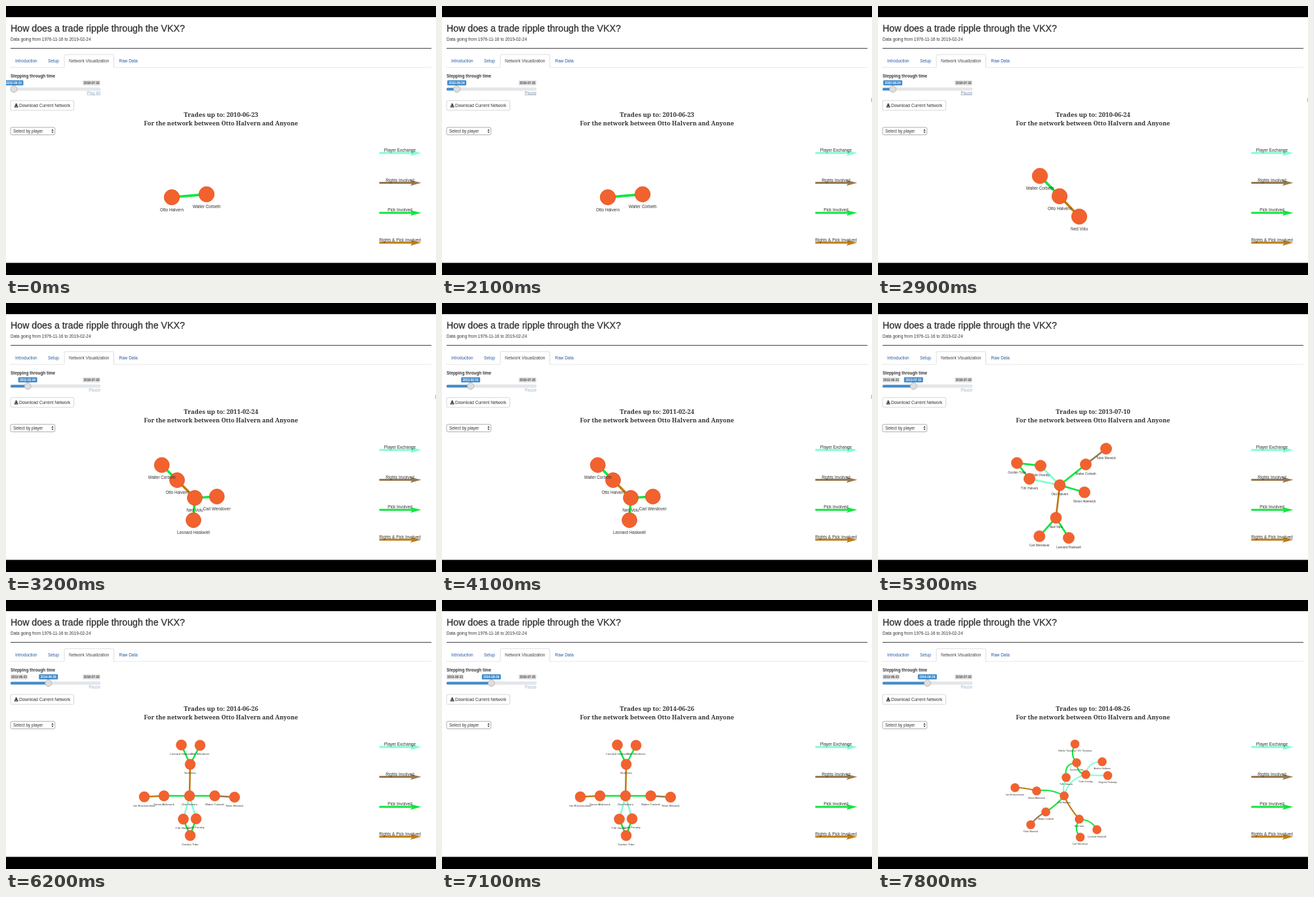
Recreate the animation shown at these times as an HTML page. Size 656 px wide and 410 px high, loop 8 s.

```html
<!DOCTYPE html>
<html lang="en">
<head>
<meta charset="utf-8">
<title>Trade network</title>
<style>
  html, body { margin: 0; width: 100%; height: 100%; overflow: hidden; background: #fff; }
  svg { display: block; width: 656px; height: 410px; font-family: "Liberation Sans", Arial, sans-serif; }
  .serif { font-family: "Noto Serif", Georgia, serif; font-weight: bold; }
</style>
</head>
<body>
<svg id="stage" viewBox="0 0 656 410" xmlns="http://www.w3.org/2000/svg">
  <rect width="656" height="410" fill="#fff"/>
  <rect width="656" height="17" fill="#000"/>
  <rect y="391.5" width="656" height="18.5" fill="#000"/>
  <g id="page"></g>
  <g id="slider"></g>
  <g id="network"></g>
  <path id="edgeMark" d="M655.5 140v6" stroke="#aaa"/>
</svg>
<script>
const LOOP = 8000;
const AQUA = '#7fffd0', BROWN = '#97794f', GREEN = '#12e640', GOLD = '#bd7d14';
const BLUE = '#428bca', LINK = '#2759a5', INK = '#333';

const dates = ['2010-06-23', '2010-06-24', '2011-02-24', '2013-02-21',
  '2013-07-10', '2014-06-26', '2014-08-26'];
const sliderTimes = [0, 2100, 3100, 4100, 5100, 6100, 7100];
const networkTimes = [0, 2200, 3200, 4200, 5200, 6200, 7300];

// Players in drawing order
const names = {
  e: 'Otto Halvern', d: 'Walter Corbeth', f: 'Ned Volu', n: 'Carl Wendover',
  k: 'Leonard Haskwell', r: 'Tobin Marwick', m: 'Gordon Tribe', j: 'Colin Fennby',
  q: 'T.W. Halsom', l: 'Simon Alderwick', p: 'Ian Brockenshaw',
  o: 'Vidrelo Tansamy / V.D. Tansamy', c: 'Andreu Solbano', t: 'Bogomir Teskalija'
};

// Links between players, drawn when both ends are present
const links = {
  ed: GREEN, ef: GOLD, fn: GREEN, fk: GREEN, dr: BROWN, ej: AQUA, eq: AQUA,
  mj: GREEN, mq: GREEN, el: GREEN, lp: GOLD, mo: GREEN, jc: AQUA, jt: AQUA
};

const layouts = [
  { scale: 1, at: { e: [253, 291.5], d: [306, 287] } },
  { scale: 1, at: { e: [277, 290], d: [247, 259], f: [307, 321] } },
  { scale: .98, at: { e: [261, 270], d: [237.7, 247], f: [288, 297], n: [321.7, 295], k: [286, 331] } },
  { scale: .98, at: { e: [279, 291.5], d: [278, 262], f: [279.5, 323], n: [227, 342],
    k: [333, 341.5], r: [277, 236] } },
  { scale: .735, at: { e: [277.3, 277.7], d: [317, 246], f: [271.5, 327.3], n: [246.3, 355.5],
    k: [291, 358], r: [348, 222], m: [212, 243.8], j: [248, 248], q: [231, 268], l: [315, 288.5] } },
  { scale: .68, at: { e: [280, 298.5], d: [318.5, 298.5], f: [281, 250.5], n: [296, 221.5],
    k: [267.5, 221], r: [348.7, 300.5], m: [281, 359], j: [290, 333.5], q: [270.5, 334],
    l: [241, 298.5], p: [211, 300] } },
  { scale: .56, at: { e: [284, 298.5], d: [256, 323], f: [307, 334], n: [308.5, 361.5],
    k: [334, 350], r: [233, 342.5], m: [303, 248], j: [317, 266], q: [287, 270.5],
    l: [242, 291], p: [209, 286], o: [300.5, 219.5], c: [342, 246.5], t: [350.5, 267.5] },
    bend: { ed: [272, 313], ef: [292, 317], fn: [298, 350], fk: [326, 335], dr: [242, 330],
      ej: [290, 273], eq: [281, 285], mj: [303, 264], mq: [283, 249], el: [264, 287],
      lp: [225, 286], mo: [292, 236], jc: [320, 246], jt: [334, 268] } }
];

const $ = id => document.getElementById(id);
const text = (x, y, size, str, attrs = '') =>
  `<text x="${x}" y="${y}" font-size="${size}" fill="${INK}" ${attrs}>${str}</text>`;
const box = (x, y, w, h, r, attrs) =>
  `<rect x="${x}" y="${y}" width="${w}" height="${h}" rx="${r}" ${attrs}/>`;
const path = (d, attrs) => `<path d="${d}" ${attrs}/>`;
const MID = 'text-anchor="middle"';

function legend() {
  const rows = [['Player Exchange', AQUA], ['Rights Involved', BROWN],
    ['Pick Involved', GREEN], ['Rights &amp; Pick Involved', GOLD]];
  return rows.map(([label, color], i) => {
    const y = 224 + i * 45.6;
    return path(`M569.5 ${y}H622`, `stroke="${color}" stroke-width="3"`) +
      path(`M617 ${y - 4}L633.5 ${y}L617 ${y + 4.5}L620 ${y}Z`, `fill="${color}"`) +
      text(601, y - 2.1, 6.4, label, MID);
  }).join('');
}

function drawPage() {
  const tab = (x, label, color) => text(x, 86, 6.45, label, `style="fill:${color}"`);
  $('page').innerHTML =
    text(7, 39, 14.2, 'How does a trade ripple through the VKX?', `stroke="${INK}" stroke-width=".3"`) +
    text(7, 52.7, 6.47, 'Data going from 1976-11-16 to 2019-02-24') +
    path('M7 64.5H649', 'stroke="#444"') +
    path('M7 93.5H89M164.5 93.5H649', 'stroke="#c4c4c4" stroke-width=".8" stroke-dasharray="1 1"') +
    path('M89 93.5V76q0-2 2-2H162.5q2 0 2 2V93.5', 'fill="#fff" stroke="#d6d6d6" stroke-width=".8"') +
    tab(14, 'Introduction', LINK) + tab(64, 'Setup', LINK) +
    tab(96, 'Network Visualization', '#444') + tab(172.5, 'Raw Data', LINK) +
    text(7, 109, 6.4, 'Stepping through time', 'font-weight="bold"') +
    box(7, 144, 96.5, 15, 2, 'fill="#fff" stroke="#ccc" stroke-width=".8"') +
    path('M14.6 148.6h2v2.2h1.7l-2.7 2.6l-2.7-2.6h1.7zM12.7 152.6h1.2l1.7 1.4l1.7-1.4h1.2v2h-5.8z', `fill="${INK}"`) +
    text(20, 153.8, 6.5, 'Download Current Network') +
    box(7, 185, 67.7, 11.3, 2, 'fill="#fff" stroke="#999" stroke-width=".8"') +
    text(11, 193, 6.4, 'Select by player') +
    path('M69.4 190l1.6-2.4l1.6 2.4zM69.4 191.4l1.6 2.4l1.6-2.4z', `fill="${INK}"`) +
    legend();
}

function drawSlider(step, playing, focused) {
  const x = 12 + step * 10.55;
  const tag = (cx, w, date, bg, fg) => box(cx - w / 2, 113.2, w, 7.8, 1.2, `fill="${bg}"`) +
    text(cx, 118.8, 4.7, date, `${MID} style="fill:${fg}" stroke="${fg}" stroke-width=".15"`);
  const linkColor = !playing ? '#9aafc5' : focused ? '#7f95ab' : '#9bb8d6';
  const hideMin = x - 14.5 < 33;
  $('slider').innerHTML =
    box(7, 124.8, 137, 4, 2, 'fill="#e6e7ea" stroke="#d2d4d8" stroke-width=".5"') +
    (step ? box(7, 124.8, x - 7, 4, 1.5, `fill="${BLUE}"`) : '') +
    `<circle cx="${x}" cy="126.6" r="5" fill="#dedede" stroke="#aaa" stroke-width=".8"/>` +
    (hideMin ? '' : tag(20, 26, dates[0], '#e1e1e1', '#444')) +
    tag(130.5, 27, '2018-07-20', '#e1e1e1', '#444') +
    tag(x, 29, dates[step], BLUE, '#fff') +
    text(144, 134.5, 6.3, playing ? 'Pause' : 'Play All', `text-anchor="end" style="fill:${linkColor}"`) +
    (focused ? path(`M${playing ? 126 : 123} 135.6H144`, `stroke="${linkColor}" stroke-width=".6"`) : '');
}

function drawNetwork(step) {
  const { scale: s, at, bend = {} } = layouts[step];
  let out = text(328, 169, 9.5, `Trades up to: ${dates[step]}`, `${MID} class="serif"`) +
    text(328, 181.5, 9.1, `For the network between ${names.e} and Anyone`, `${MID} class="serif"`);
  for (const key in links) {
    const [a, b] = [at[key[0]], at[key[1]]];
    if (!a || !b) continue;
    const curve = bend[key] ? `Q${bend[key]} ${b}` : `L${b}`;
    out += path(`M${a}${curve}`, `fill="none" stroke="${links[key]}" stroke-width="${3.8 * s}"`);
  }
  for (const key in names) {
    if (!at[key]) continue;
    const [x, y] = at[key];
    out += `<circle cx="${x}" cy="${y}" r="${11.7 * s}" fill="#f2622e" stroke="#dc5522" stroke-width="${.8 * s}"/>` +
      text(x, y + 21.4 * s, 6.4 * s, names[key], MID);
  }
  $('network').innerHTML = out;
}

const stepAt = (times, t) => times.filter(start => start <= t).length - 1;
const begin = performance.now();
let shown = '';

function render(now) {
  const t = Math.max(0, now - begin) % LOOP;
  const slide = stepAt(sliderTimes, t), graph = stepAt(networkTimes, t);
  const playing = t >= 1100, focused = t < 3100, mark = t >= 2000 && t < 4600;
  const state = [slide, graph, playing, focused, mark].join();
  if (state !== shown) {
    shown = state;
    drawSlider(slide, playing, focused);
    drawNetwork(graph);
    $('edgeMark').style.display = mark ? '' : 'none';
  }
  requestAnimationFrame(render);
}

drawPage();
render(begin);
</script>
</body>
</html>
```
